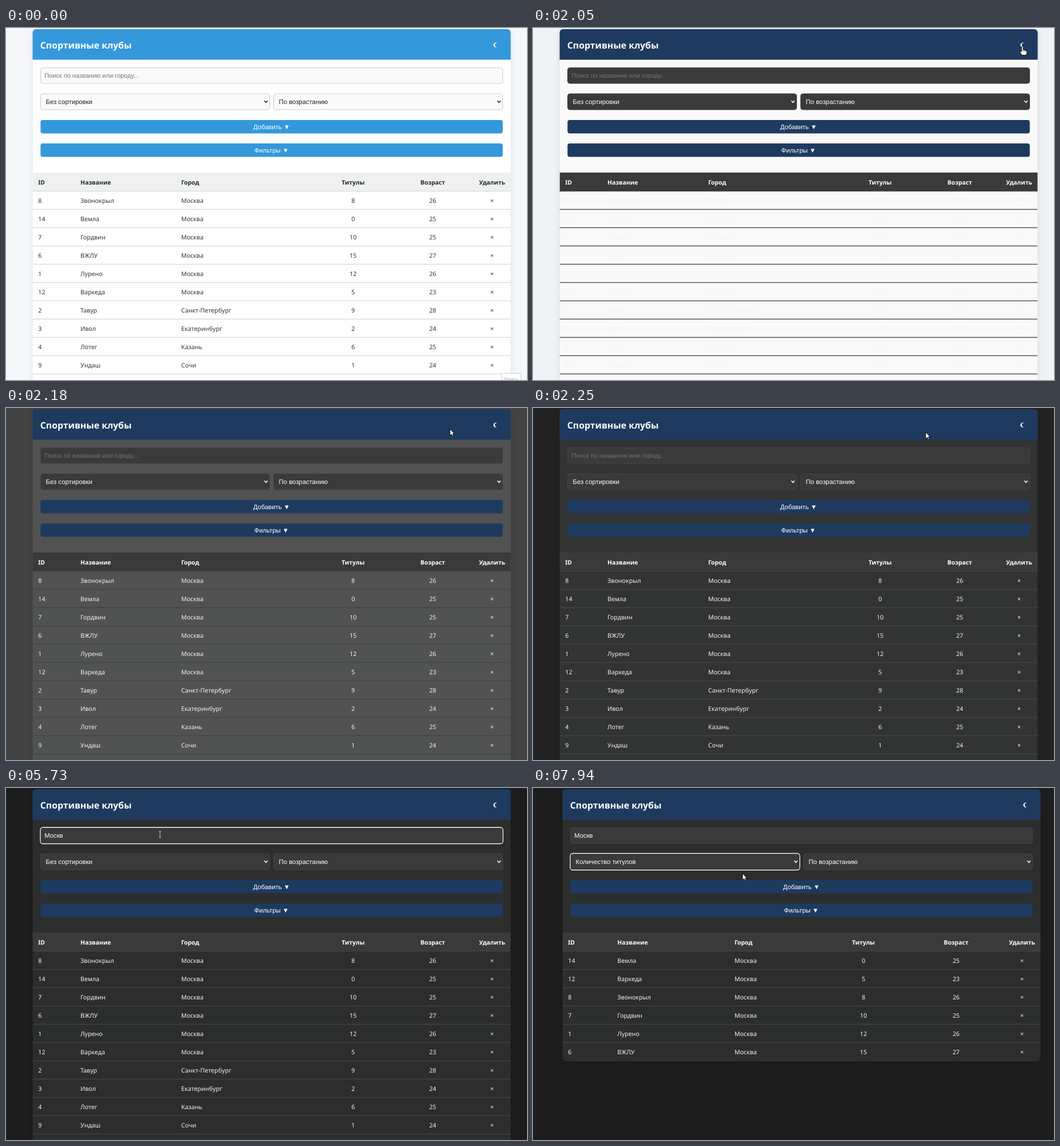
An HTML page with a canvas that plays this animation: 910 by 616 pixels, repeating every 8000 ms.

```html
<!DOCTYPE html>
<html lang="ru">
<head>
<meta charset="utf-8">
<title>Спортивные клубы</title>
<style>
  html, body { margin: 0; width: 100%; height: 100%; overflow: hidden; background: #f5f7fa; }
  canvas { display: block; }
</style>
</head>
<body>
<canvas id="stage" width="910" height="616"></canvas>
<script>
const ctx = document.getElementById('stage').getContext('2d');
const LOOP = 8000, W = 910, H = 616;

const TABLE = '"Noto Sans", "Open Sans", sans-serif';
const FIELD = '"Liberation Sans", Arial, sans-serif';
const FONT = {
  title: `bold 15.8px ${TABLE}`,
  head: `bold 10.4px ${TABLE}`,
  cell: `10.65px ${TABLE}`,
  hint: `11px ${FIELD}`,
  field: `11.3px ${FIELD}`,
  tip: `8px ${FIELD}`
};

const LIGHT = {
  bar: '#3498db', field: '#fafafa', edge: '#cccccc', head: '#eff1f1',
  line: '#dadada', text: '#333333', strong: '#25282b', input: '#222222'
};
const DARK = {
  bar: '#1e3a5f', field: '#3a3a3a', edge: '#444444', head: '#3a3a3a',
  line: '#444444', text: '#f4f4f4', strong: '#ffffff', input: '#ffffff'
};
const PAGE = [[245, 247, 250], [29, 29, 29]];
const CARD = [[254, 254, 254], [44, 45, 45]];

const HEADS = ['ID', 'Название', 'Город', 'Титулы', 'Возраст', 'Удалить'];
const CLUBS = [
  [8, 'Звонокрыл', 'Москва', 8, 26],
  [14, 'Вемла', 'Москва', 0, 25],
  [7, 'Гордвин', 'Москва', 10, 25],
  [6, 'ВЖЛУ', 'Москва', 15, 27],
  [1, 'Лурено', 'Москва', 12, 26],
  [12, 'Варкеда', 'Москва', 5, 23],
  [2, 'Тавур', 'Санкт-Петербург', 9, 28],
  [3, 'Ивол', 'Екатеринбург', 2, 24],
  [4, 'Лотег', 'Казань', 6, 25],
  [9, 'Ундаш', 'Сочи', 1, 24]
];
const FOUND = CLUBS.filter(club => club[2].startsWith('Москв'));
const SORTED = [...FOUND].sort((a, b) => a[3] - b[3]);
const COLS_ALL = [56.3, 130, 306, 606.3, 745.3, 849];
const COLS_FOUND = [56.3, 142.3, 347, 572.2, 734, 849];

// Times in ms
const THEME = 2041, FADE = 268, FOCUS = 2730, FILTER = 5860, SELECT = 7130, SORT = 7740;
const KEYS = [3470, 4130, 4600, 4930, 5200];
const CARET = [[2730, 3270], [3470, 4000], [4130, 5730], [6190, 6650]];

// Pointer path: time, x, y
const PATH = [
  [70, 520, 604], [260, 550, 470], [500, 700, 300], [660, 820, 150],
  [830, 888, 50], [900, 885, 47], [1100, 868, 38], [1390, 857, 31],
  [1920, 857, 31], [2120, 853.5, 32], [2250, 687, 42], [2450, 450, 72],
  [2660, 285, 118], [2730, 270, 84], [2860, 269, 81], [6600, 269, 81],
  [6930, 303, 120], [7200, 303, 120], [7870, 236, 155], [7940, 366, 149.5]
];
const ARROW = new Path2D('M0 0V11.8L2.7 9.3L4.5 13.2L6.4 12.3L4.7 8.5H8.1Z');
const HAND = new Path2D('M-1.5 1.4Q0-1 1.5 1.4V5.6L6 6.8Q8 7.4 8 9.4V12L6.6 16H-.4L-4.4 10.6Q-4.6 8.4-2.8 9L-1.5 10.2Z');
const FINGERS = new Path2D('M1.5 5.6V9M3.8 6.6V9M5.9 7V9.3');
const BEAM = new Path2D('M-2-5H2M-2 5.5H2M0-5V5.5');

// CSS "ease" curve
function ease(x) {
  if (x <= 0) return 0;
  if (x >= 1) return 1;
  const bez = (s, a, b) => 3 * s * (1 - s) ** 2 * a + 3 * s * s * (1 - s) * b + s ** 3;
  let lo = 0, hi = 1;
  for (let i = 0; i < 24; i++) {
    const mid = (lo + hi) / 2;
    if (bez(mid, 0.25, 0.25) < x) lo = mid; else hi = mid;
  }
  return bez(lo, 0.1, 1);
}

function mix([a, b], k) {
  return `rgb(${a.map((v, i) => Math.round(v + (b[i] - v) * k)).join()})`;
}

function text(str, x, y, font, color, align = 'left') {
  ctx.font = font;
  ctx.fillStyle = color;
  ctx.textAlign = align;
  ctx.fillText(str, x, y);
}

function box(x, y, w, h, r, fill, stroke, line = 1) {
  ctx.beginPath();
  ctx.roundRect(x, y, w, h, r);
  if (fill) { ctx.fillStyle = fill; ctx.fill(); }
  if (stroke) { ctx.strokeStyle = stroke; ctx.lineWidth = line; ctx.stroke(); }
}

function field(x, y, w, h, skin, focused) {
  box(x + 0.5, y + 0.5, w - 1, h - 1, 4, skin.field, skin.edge);
  if (!focused) return;
  box(x + 1, y + 1, w - 2, h - 2, 3.5, null, '#101010');
  box(x, y, w, h, 4.5, null, '#ffffff', 1.3);
}

function select(x, label, skin, focused) {
  field(x, 114.5, 401, 29, skin, focused);
  text(label, x + 9.6, 133, FONT.field, skin.input);
  ctx.beginPath();
  ctx.moveTo(x + 391.3, 127.3);
  ctx.lineTo(x + 394.1, 130.3);
  ctx.lineTo(x + 396.9, 127.3);
  ctx.strokeStyle = skin.input;
  ctx.lineWidth = 1.5;
  ctx.stroke();
}

function button(y, label, skin) {
  box(60.3, y, 807.4, 23.5, 4, skin.bar);
  text(label, 463.8, y + 15.5, FONT.field, '#ffffff', 'center');
}

function moon() {
  ctx.beginPath();
  ctx.arc(855.6, 29.8, 4.2, -1, 1, true);
  ctx.arc(857.3, 29.8, 3.57, 1.41, -1.41);
  ctx.fillStyle = '#ffffff';
  ctx.fill();
}

function search(t, skin) {
  const typed = 'Москв'.slice(0, KEYS.filter(k => t >= k).length);
  field(60, 69, 808, 28.5, skin, t >= FOCUS && t < SELECT);
  if (typed) text(typed, 67.2, 87, FONT.field, skin.input);
  else text('Поиск по названию или городу...', 67.2, 87, FONT.hint, '#757575');
  if (CARET.some(([on, off]) => t >= on && t < off)) {
    ctx.font = FONT.field;
    ctx.fillStyle = skin.input;
    ctx.fillRect(67.6 + ctx.measureText(typed).width, 78, 1, 11.5);
  }
}

function table(t, skin) {
  const rows = t < FILTER ? CLUBS : t < SORT ? FOUND : SORTED;
  const cols = t < FILTER ? COLS_ALL : COLS_FOUND;
  const align = i => i < 3 ? 'left' : 'center';
  const rule = y => {
    ctx.fillStyle = skin.line;
    ctx.fillRect(46.5, y - 0.2, 835, 1.3);
  };
  ctx.fillStyle = skin.head;
  ctx.fillRect(46.5, 253, 835, 32);
  rule(285);
  HEADS.forEach((h, i) => text(h, cols[i], 273.8, FONT.head, skin.strong, align(i)));
  rows.forEach((club, n) => {
    const y = 305.6 + 32 * n;
    [...club, '×'].forEach((v, i) => text(v, cols[i], y, FONT.cell, skin.text, align(i)));
    rule(317 + 32 * n);
  });
}

function card(t, skin, k) {
  const height = t < FILTER ? 640 : 475.5;
  ctx.save();
  if (t >= FILTER) ctx.translate(5, 0);
  ctx.save();
  ctx.shadowColor = 'rgba(0,0,0,.1)';
  ctx.shadowBlur = 12;
  ctx.shadowOffsetY = 3;
  box(46.5, 2, 835, height, 6, mix(CARD, k));
  ctx.restore();

  ctx.save();
  ctx.beginPath();
  ctx.roundRect(46.5, 2, 835, height, 6);
  ctx.clip();
  ctx.fillStyle = skin.bar;
  ctx.fillRect(46, 2, 836, 53.5);
  text('Спортивные клубы', 59.8, 36.2, FONT.title, '#ffffff');
  moon();
  search(t, skin);
  select(60, t < SORT ? 'Без сортировки' : 'Количество титулов', skin, t >= SELECT);
  select(467, 'По возрастанию', skin, false);
  button(161, 'Добавить ▼', skin);
  button(202, 'Фильтры ▼', skin);
  table(t, skin);
  ctx.restore();
  ctx.restore();
}

function tooltip(t) {
  const alpha = 1 - Math.max(0, t - 70) / 200;
  if (alpha <= 0) return;
  ctx.globalAlpha = alpha;
  box(865.5, 604.5, 34, 18, 0, '#ffffff', '#c9c9d4');
  text('Запись', 868.5, 616.5, FONT.tip, '#a3a3c4');
  ctx.globalAlpha = 1;
}

function pointer(t) {
  if (t < PATH[0][0]) return;
  let i = PATH.findIndex(p => p[0] > t);
  if (i < 0) i = PATH.length - 1;
  const [t0, x0, y0] = PATH[i - 1], [t1, x1, y1] = PATH[i];
  const k = Math.min(1, (t - t0) / (t1 - t0));
  ctx.save();
  ctx.translate(x0 + (x1 - x0) * k, y0 + (y1 - y0) * k);
  ctx.lineJoin = 'round';
  ctx.lineWidth = 1;
  if (t >= FOCUS && t < 6720) {
    ctx.strokeStyle = '#c4c4c4';
    ctx.stroke(BEAM);
  } else {
    const hand = t >= 1000 && t < 2150;
    const shape = hand ? HAND : ARROW;
    ctx.fillStyle = '#ffffff';
    ctx.strokeStyle = '#000000';
    ctx.fill(shape);
    ctx.stroke(shape);
    if (hand) ctx.stroke(FINGERS);
  }
  ctx.restore();
}

function draw(t) {
  const k = ease((t - THEME) / FADE);
  const skin = t < THEME ? LIGHT : DARK;
  ctx.textRendering = 'geometricPrecision';
  ctx.fillStyle = mix(PAGE, k);
  ctx.fillRect(0, 0, W, H);
  card(t, skin, k);
  tooltip(t);
  pointer(t);
}

const start = performance.now();
function tick() {
  draw((performance.now() - start) % LOOP);
  requestAnimationFrame(tick);
}
tick();
</script>
</body>
</html>
```
